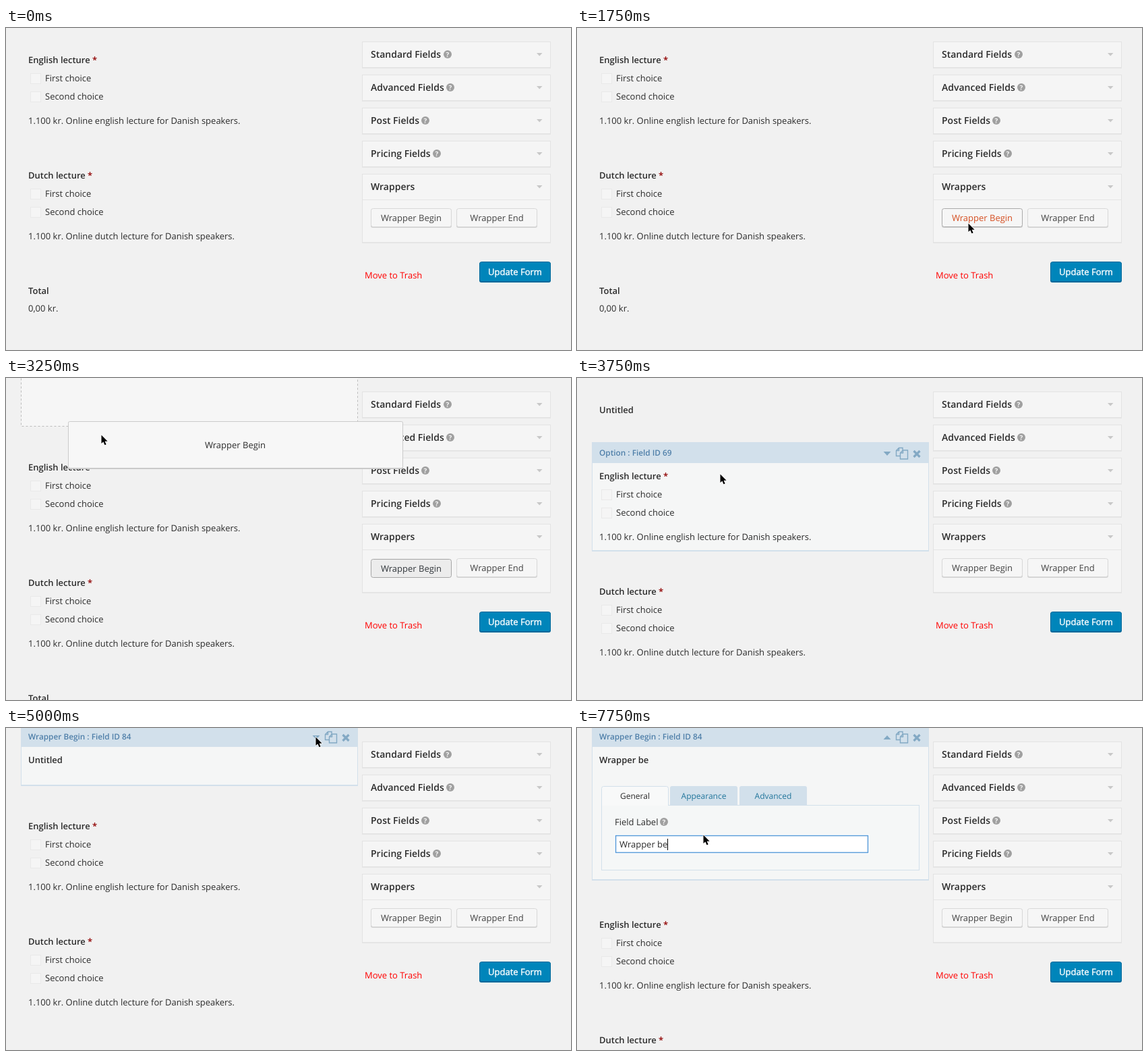
An HTML page for the animation above (8 s loop, 838 by 477 pixels).

```html
<!DOCTYPE html>
<html lang="en">
<head>
<meta charset="utf-8">
<title>Form editor</title>
<style>
html, body { margin: 0; width: 100%; height: 100%; overflow: hidden; background: #f1f1f1; }
svg { display: block; width: 838px; height: 477px; }
text { font: 13px "Open Sans", sans-serif; fill: #2c2c2c; white-space: pre; text-rendering: geometricPrecision; }
.b { font-weight: 600; }
.title { font-size: 14px; font-weight: 600; }
.head { font-size: 11.8px; font-weight: 600; fill: #4f7fa9; }
.tab { font-size: 12px; }
.q { font-size: 10px; font-weight: 700; fill: #f5f5f5; }
.mid { text-anchor: middle; }
.primary { fill: #fff; stroke: #fff; stroke-width: .4px; }
</style>
</head>
<body>
<svg id="stage" viewBox="0 0 838 477"></svg>
<script>
const TICK = 250, TICKS = 32;
const BLUE = '#d2e0eb', ICON = '#83a9c4';
const stage = document.getElementById('stage');

// Pointer position per tick, beginning at tick 3; the last one holds.
const path = [
  [822, 185], [640, 215], [500, 240], [510, 262], [580, 289], [580, 289],
  [280, 218], [215, 165], [170, 120], [150, 95], [141, 84],
  [165, 100], [212, 142], [212, 125], [203, 70], [195, 36],
  [340, 24], [459, 13], [199, 118], [187, 158]
];

const text = (x, y, s, cls = '', extra = '') => `<text x="${x}" y="${y}" class="${cls}" ${extra}>${s}</text>`;
const rect = (x, y, w, h, fill, extra = '') =>
  `<rect x="${x}" y="${y}" width="${w}" height="${h}" fill="${fill}" ${extra}/>`;
// Box with a crisp one pixel border inside the given bounds
const box = (x, y, w, h, fill, line, extra = '') =>
  rect(x + .5, y + .5, w - 1, h - 1, fill, `stroke="${line}" ${extra}`);
const shape = (d, fill, extra = '') => `<path d="${d}" fill="${fill}" ${extra}/>`;
const help = (x, y) => `<circle cx="${x}" cy="${y}" r="6" fill="#a0a0a0"/>` + text(x, y + 3.7, '?', 'q mid');

function button(x, label, state) {
  const down = state === 'down', y = down ? 268 : 267;
  const line = { hover: '#aaa', down: '#a5a5a5' }[state] || '#d8d8d8';
  const color = { hover: '#d54e21', down: '#32373c' }[state] || '#444';
  return (down ? '' : rect(x, 268, 120, 28, '#d2d2d2', 'rx="3"')) +
    box(x, y, 120, 28, down ? '#ececec' : '#f6f6f6', line, 'rx="3"') +
    text(x + 60, y + 19, label, 'mid', `style="fill:${color}"`);
}

function sidebar(state) {
  const panel = (y, h, name, qx) =>
    rect(528, y + 1, 280, h, '#e6e6e6') + box(528, y, 280, h, '#f5f5f5', '#e3e3e3') +
    text(541, y + 24, name, 'title') + (qx ? help(qx, y + 19) : '') +
    shape(`M787 ${y + 17}h8.5l-4.25 4.5z`, '#c8c8c8');
  return panel(20, 39, 'Standard Fields', 655) + panel(69, 39, 'Advanced Fields', 659) +
    panel(118, 39, 'Post Fields', 622) + panel(167, 39, 'Pricing Fields', 639) +
    panel(216, 102, 'Wrappers') + rect(529, 254, 278, 1, '#e5e5e5') +
    button(541, 'Wrapper Begin', state) + button(668, 'Wrapper End') +
    text(532, 371, 'Move to Trash', '', 'style="fill:#f00"') +
    rect(702, 347, 106, 30, '#006799', 'rx="3"') +
    box(702, 346, 106, 30, '#0085ba', '#006799', 'rx="3"') +
    text(755, 366, 'Update Form', 'mid primary');
}

function frame(y, h, name, open) {
  const tip = open ? `M454.5 ${y + 20}h11l-5.5-6z` : `M454.5 ${y + 14}h11l-5.5 6z`;
  const pages = `M479.5 ${y + 20.5}h-6v-8l4-4h5.5v4M477.5 ${y + 8.5}v4h-4` +
    `M479.5 ${y + 16}l4-4h7v13h-11zM483.5 ${y + 12}v4h-4`;
  return rect(22, y + 1, 500, h, BLUE) + box(22, y, 500, h, '#f5f6f6', BLUE) +
    rect(22, y, 500, 31, BLUE) + text(33, y + 20, name, 'head') + shape(tip, ICON) +
    shape(pages, 'none', `stroke="${ICON}" stroke-width="1.4"`) +
    shape(`M499.5 ${y + 13}l9 9m0-9l-9 9`, 'none', `stroke="${ICON}" stroke-width="3.2"`);
}

function lecture(y, lang, id, hover) {
  const choice = (dy, s) => box(36, y + dy - 12, 16, 16, '#f5f5f5', '#e9e9e9') + text(58, y + dy, s);
  return (hover ? frame(y, 161, 'Option : Field ID ' + id) : '') +
    text(33, y + 55, `${lang} lecture <tspan fill="#900000">*</tspan>`, 'b') +
    choice(82, 'First choice') + choice(109, 'Second choice') +
    text(33, y + 145, `1.100 kr. Online ${lang.toLowerCase()} lecture for Danish speakers.`);
}

function settings(value, focus, selected) {
  const tab = (x, s) => shape(`M${x} 114V89q0-3 3-3h94q3 0 3 3v25z`, BLUE) +
    text(x + 50, 105, s, 'tab mid', 'style="fill:#21759b"');
  return box(36, 114, 472, 97, '#f5f7f7', BLUE) + tab(138, 'Appearance') + tab(241, 'Advanced') +
    shape('M36.5 115V89.5q0-3 3-3h93q3 0 3 3V115', '#f8f9f9', `stroke="${BLUE}"`) +
    text(86, 105, 'General', 'tab mid') + text(56, 144, 'Field Label') + help(129, 139) +
    (focus ? rect(55.5, 157.5, 378, 29, '#fff') : '') +
    box(57, 159, 375, 26, '#fff', focus ? '#5b9dd9' : '#ddd', focus ? 'stroke-width="1.5"' : '') +
    (selected ? rect(63, 163, 48.5, 19, '#aed1f8') : '') +
    text(63, 177, value, '', 'id="value"');
}

function render(n) {
  const pos = n < 3 ? null : path[Math.min(n - 3, path.length - 1)];
  const [cx, cy] = pos || [-99, -99];
  const drag = n >= 9 && n <= 13, added = n >= 14, open = n >= 21, typing = n >= 27;
  const over = (y, h) => !drag && cx >= 22 && cx < 522 && cy >= y && cy < y + h;
  const slot = y => box(22, y, 500, 75, '#f6f6f6', '#bcbcbc', 'stroke-dasharray="3 3"');
  const value = typing ? 'Wrapper be'.slice(0, (n - 26) * 2) : 'Untitled';
  const middle = drag && cy > 130;
  let y = -3, out = '';

  if (added) {
    const h = open ? 228 : 88;
    if (over(y, h)) out += frame(y, h, 'Wrapper Begin : Field ID 84', open);
    out += text(33, 52, value, 'b');
    if (open) out += settings(value, n >= 23, n >= 24 && !typing);
    y += open ? 244 : 98;
  } else if (drag && !middle) {
    out += slot(y);
    y += 85;
  }
  out += lecture(y, 'English', 69, over(y, 161));
  y += 171;
  if (middle) {
    out += slot(y);
    y += 85;
  }
  out += lecture(y, 'Dutch', 70, over(y, 161));
  y += 171;
  out += text(33, y + 55, 'Total', 'b') + text(33, y + 81, '0,00 kr.');
  out += sidebar(n === 7 ? 'hover' : n === 8 || drag ? 'down' : '');
  if (drag) {
    const x = cx - 49, top = cy - 20;
    out += rect(x, top + 1, 497, 70, '#c9c9c9', 'rx="2"') +
      box(x, top, 497, 70, '#f7f7f7', '#cbcbcb', 'rx="2"') +
      text(x + 248, top + 40, 'Wrapper Begin', 'mid');
  }
  if (pos) out += shape('M0 0V14.5L3.3 11.5L5.7 17L8.2 16L5.9 10.6H10.5Z', '#000',
    `stroke="#fff" stroke-width="1.6" paint-order="stroke" transform="translate(${cx + .5} ${cy + .5}) scale(.87)"`);
  stage.innerHTML = out;

  if (typing) {
    const end = 63 + document.getElementById('value').getComputedTextLength();
    stage.insertAdjacentHTML('beforeend', rect(Math.round(end), 164, 1, 17, '#000'));
  }
}

let shown = -1;
const start = performance.now();
function play(now) {
  const n = Math.floor(Math.max(0, now - start) / TICK) % TICKS;
  if (n !== shown) render(shown = n);
  requestAnimationFrame(play);
}
play(start);
</script>
</body>
</html>
```
